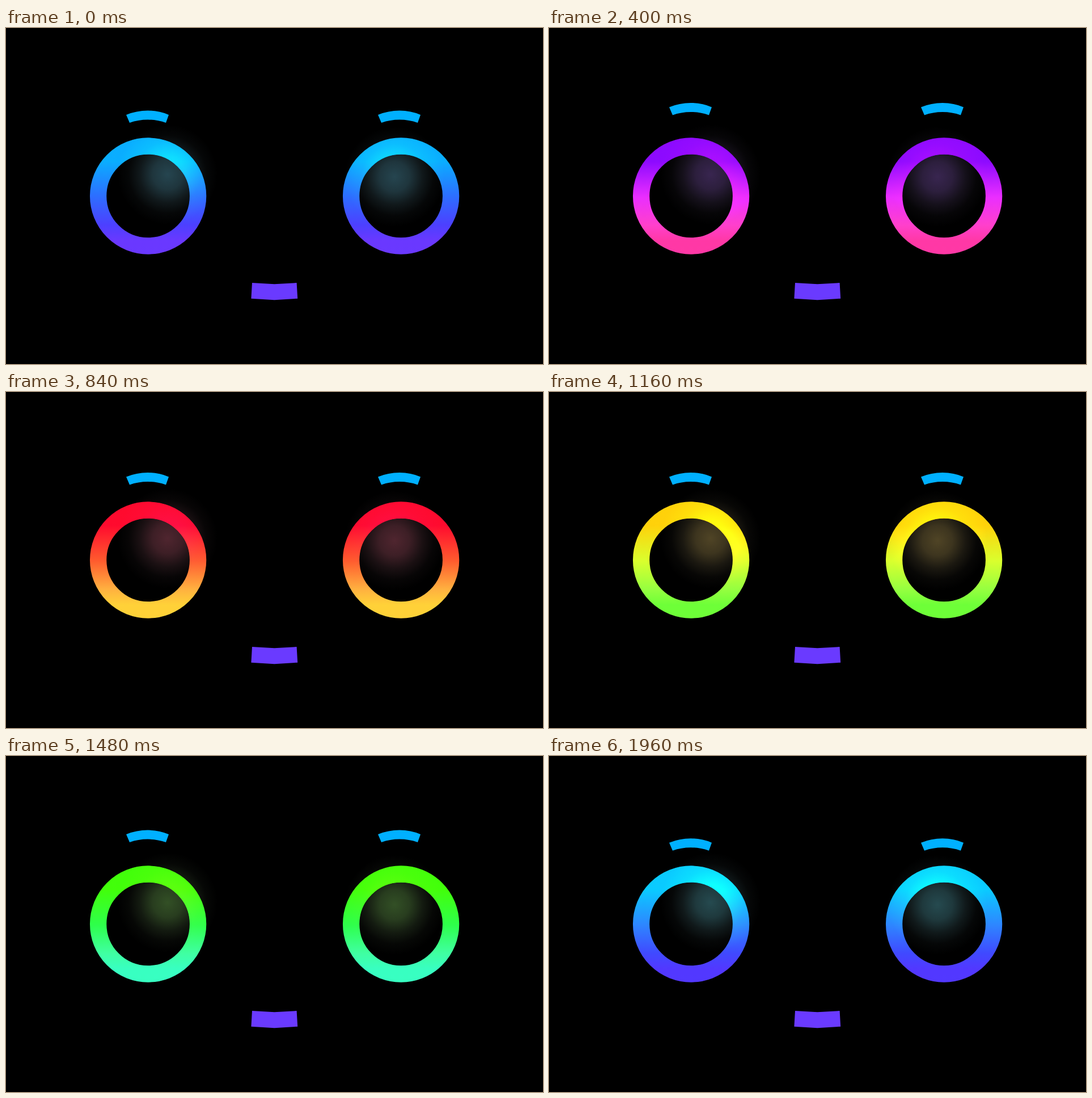
Recreate the animation shown at these times as an HTML page without scripts. Size 947x592 px, loop 2000 ms.

```html
<!DOCTYPE html>
<html lang="en">
<head>
<meta charset="utf-8">
<title>Colour-cycling face</title>
<style>
  @property --turn { syntax: "<angle>"; inherits: true; initial-value: 0deg; }

  html, body { margin: 0; width: 100%; height: 100%; overflow: hidden; background: #000; }

  /* One stepped angle drives both the hues and the brows. */
  svg { display: block; width: 947px; height: 592px; animation: cycle 2s steps(50) -1ms infinite; }
  @keyframes cycle { from { --turn: 0deg; } to { --turn: 360deg; } }

  stop { stop-color: hsl(calc(var(--h) * 1deg + var(--turn)) var(--s, 100%) var(--l)); }
  .brows { fill: #00b0ff; transform: translateY(calc(-7.5px * (1 - cos(2 * var(--turn))))); }
  .ring { fill: none; stroke-width: 29.3px; }
  .shine { mix-blend-mode: plus-lighter; }
</style>
</head>
<body>
<svg viewBox="0 0 947 592">
  <defs>
    <linearGradient id="iris" gradientUnits="userSpaceOnUse" x1="0" y1="235" x2="0" y2="375">
      <stop offset="0" style="--h:200; --l:52%"/>
      <stop offset=".45" style="--h:222; --l:59%"/>
      <stop offset=".8" style="--h:244; --l:62.5%"/>
      <stop offset="1" style="--h:255; --l:61%"/>
    </linearGradient>

    <radialGradient id="glow" gradientUnits="userSpaceOnUse" r="88">
      <stop offset="0" style="--h:195; --s:36%; --l:23%"/>
      <stop offset=".3" style="--h:195; --s:33%; --l:18%"/>
      <stop offset=".56" style="--h:195; --s:24%; --l:8.5%"/>
      <stop offset=".78" style="--h:195; --s:15%; --l:2.5%"/>
      <stop offset="1" style="--h:195; --s:0%; --l:0%"/>
    </radialGradient>
    <radialGradient id="glowL" href="#glow" cx="285" cy="258"/>
    <radialGradient id="glowR" href="#glow" cx="685" cy="262"/>

    <radialGradient id="shine" gradientUnits="userSpaceOnUse" r="88">
      <stop offset="0" style="--h:192; --s:85%; --l:17%"/>
      <stop offset=".36" style="--h:192; --s:85%; --l:12%"/>
      <stop offset=".66" style="--h:192; --s:85%; --l:4%"/>
      <stop offset="1" style="--h:192; --s:85%; --l:0%"/>
    </radialGradient>
    <radialGradient id="shineL" href="#shine" cx="285" cy="258"/>
    <radialGradient id="shineR" href="#shine" cx="685" cy="262"/>

    <path id="brow" d="M0 7.5Q18 0 38 0T75 7.5L70 21.5Q55 16 38 16T6 21.5Z"/>
  </defs>

  <rect width="947" height="592"/>

  <g class="brows">
    <use href="#brow" x="212" y="145.5"/>
    <use href="#brow" x="656" y="145.5"/>
  </g>

  <circle cx="285" cy="258" r="88" fill="url(#glowL)"/>
  <circle cx="685" cy="262" r="88" fill="url(#glowR)"/>

  <g class="ring" stroke="url(#iris)">
    <circle cx="250.6" cy="296" r="88"/>
    <circle cx="696.6" cy="296" r="88"/>
  </g>
  <g class="ring shine">
    <circle cx="250.6" cy="296" r="88" stroke="url(#shineL)"/>
    <circle cx="696.6" cy="296" r="88" stroke="url(#shineR)"/>
  </g>

  <path fill="#6a3aff" d="M434 449L473.3 451.3L512.6 449L514.2 476.7L473.3 479.2L432.4 476.7Z"/>
</svg>
</body>
</html>
```
